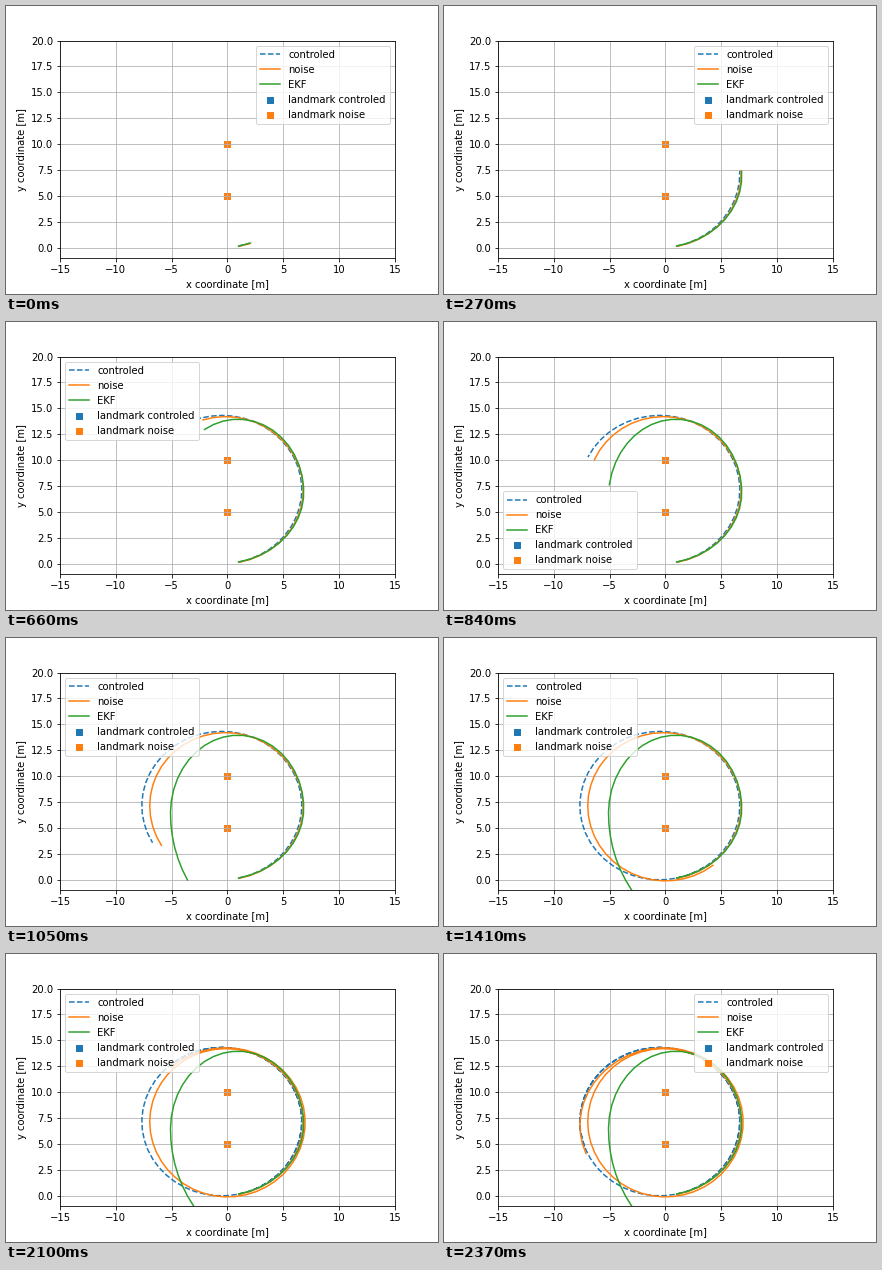
Animation of 432x288 px, one loop 2.4 s. Source, as a matplotlib script:

```python
import numpy as np
import matplotlib.pyplot as plt
from matplotlib.animation import FuncAnimation

FRAMES = 80
INTERVAL = 30

# The legend dodges the curves: corner from the given frame on
LEGEND_MOVES = {0: "upper right", 14: "upper left", 23: "lower left",
                33: "upper left", 71: "upper right"}

# Bottom, right, top and left of the estimate, then the point it drifts off to
EKF_TIMES = [-0.5, 10.6, 20.5, 31.1, 48.1]
EKF_X = np.array([-0.56, 6.84, 0.95, -5.1, 5.4])
EKF_Y = np.array([0, 6.9, 13.95, 6.4, -6])


def controlled_path(steps):
    """Unit steps, turning 8 degrees each time."""
    heading = np.radians(8 * steps)
    return np.cumsum(np.cos(heading)), np.cumsum(np.sin(heading))


def noisy_path(steps):
    """A circle whose centre and radius drift slowly."""
    angle = np.radians(8.02 * steps + 4.8)
    loops = angle / (2 * np.pi)
    centre_x = -0.56 * (1 - loops) ** 2
    radius_x = 6.92 + 0.52 * (loops - 0.85) ** 2
    radius_y = 7.1 + 0.08 * loops
    return centre_x + radius_x * np.sin(angle), 7.06 - radius_y * np.cos(angle)


def ekf_path(steps):
    """Quarter ellipses joining the key points."""
    phase = np.interp(steps, EKF_TIMES, range(len(EKF_TIMES)))
    i = np.minimum(phase.astype(int), len(EKF_TIMES) - 2)
    angle = (phase - i) * np.pi / 2
    rise, ease = np.sin(angle), 1 - np.cos(angle)
    sideways = i % 2 == 0
    x = EKF_X[i] + np.diff(EKF_X)[i] * np.where(sideways, rise, ease)
    y = EKF_Y[i] + np.diff(EKF_Y)[i] * np.where(sideways, ease, rise)
    return x, y


steps = np.arange(1, FRAMES + 2)
paths = [path(steps) for path in (controlled_path, noisy_path, ekf_path)]

fig, ax = plt.subplots(figsize=(6, 4), dpi=72)
fig.subplots_adjust(left=0.125, right=0.9, bottom=0.125, top=0.88)
ax.set(xlim=(-15, 15), ylim=(-1, 20),
       xlabel="x coordinate [m]", ylabel="y coordinate [m]")
ax.grid(True)

lines = [ax.plot([], [], style, label=label)[0]
         for style, label in [("--", "controled"), ("-", "noise"), ("-", "EKF")]]
for color, label in [("C0", "landmark controled"), ("C1", "landmark noise")]:
    ax.scatter([0, 0], [5, 10], marker="s", color=color, label=label)


def update(frame):
    count = frame + 2
    for line, (x, y) in zip(lines, paths):
        line.set_data(x[:count], y[:count])
    last_move = max(start for start in LEGEND_MOVES if start <= frame)
    return [*lines, ax.legend(loc=LEGEND_MOVES[last_move])]


anim = FuncAnimation(fig, update, frames=FRAMES, interval=INTERVAL,
                     repeat=True, repeat_delay=0)
plt.show()
```
